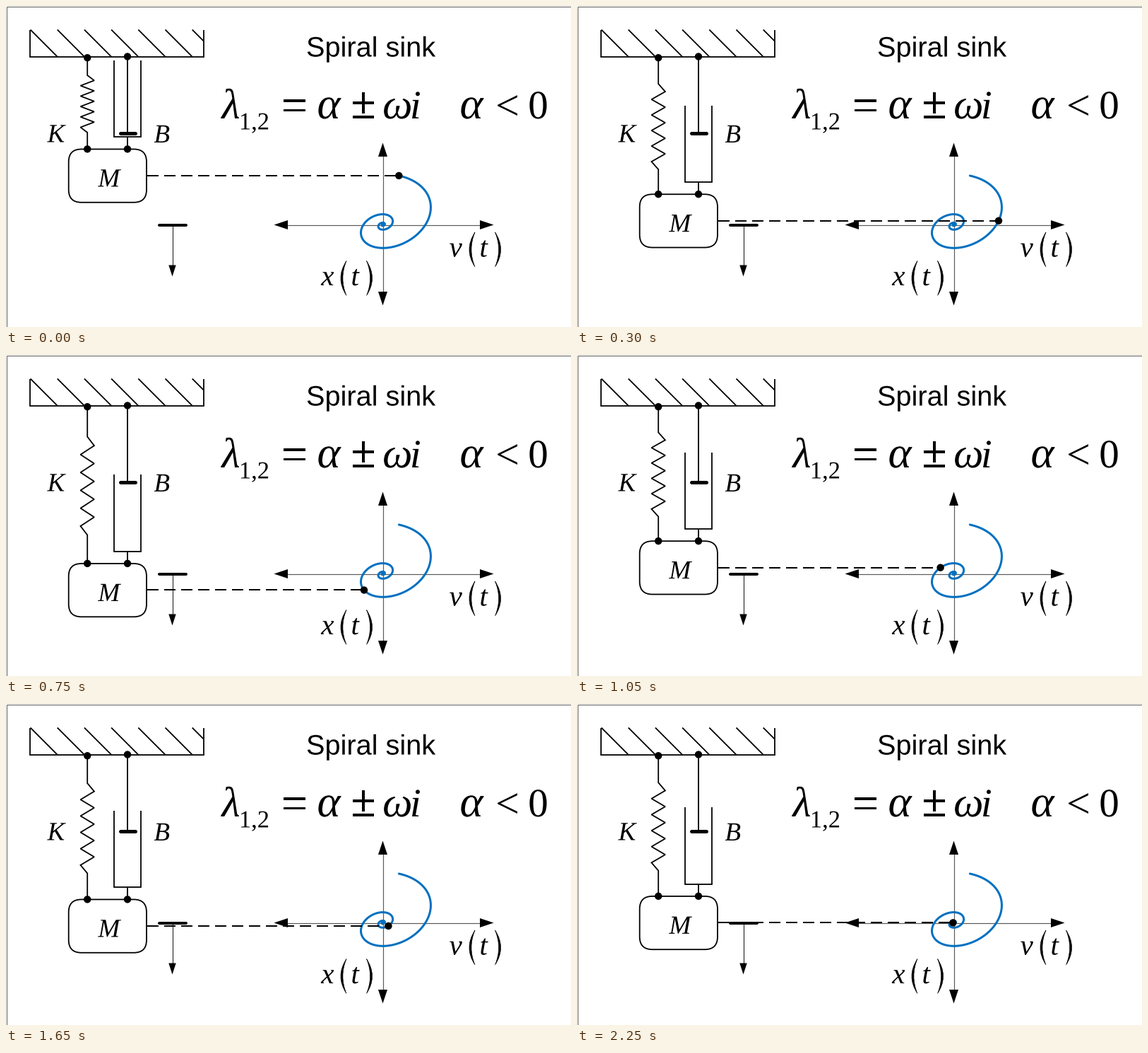
A matplotlib script that plays this animation: 800x454 px, repeating every 2400 ms.

```python
import numpy as np
import matplotlib.pyplot as plt
from matplotlib.animation import FuncAnimation
from matplotlib.patches import Circle, FancyBboxPatch, PathPatch, Polygon, Rectangle
from matplotlib.path import Path
from matplotlib.textpath import TextPath
from matplotlib.transforms import Affine2D

W, H, DPI = 800, 454, 64
PT = 72 / DPI
BLUE = "#0070c0"
GRAY = "#5a5a5a"
CX, CY = 533, 309
SPRING_X, ROD_X = 114.7, 171.5

# Whole numbers are pixel centres
fig = plt.figure(figsize=(W / DPI, H / DPI), dpi=DPI, facecolor="white")
ax = fig.add_axes([0, 0, 1, 1])
ax.set_xlim(-0.5, W - 0.5)
ax.set_ylim(H - 0.5, -0.5)
ax.axis("off")

shift = Affine2D()
moving = shift + ax.transData


def line(xs, ys, width=1.8, color="black", z=2, cap="butt", **kw):
    return ax.plot(xs, ys, color=color, lw=width * PT, zorder=z,
                   solid_capstyle=cap, solid_joinstyle="miter", **kw)[0]


def dot(x, y, r=5.2, z=6, **kw):
    return ax.add_patch(Circle((x, y), r, fc="black", ec="none", zorder=z, **kw))


def text(s, x, base, size, family="Liberation Serif", style="normal", **kw):
    """Text with its ink centred on x, standing on the given baseline."""
    path = TextPath((0, 0), s, size=size, prop={"family": [family], "style": style})
    box = path.get_extents()
    verts = path.vertices * [1, -1] + [x - (box.x0 + box.x1) / 2, base]
    ax.add_patch(PathPatch(Path(verts, path.codes), fc="black", ec="none",
                           zorder=3, **kw))


def italic(s, x, base, size, **kw):
    text(s, x, base, size, style="italic", **kw)


def paren(tip, bulge, y, half=24.5):
    """Tall thin parenthesis, opening towards its tips."""
    side = np.sign(bulge)
    verts = [(tip, y - half), (tip + 1.8 * bulge, y), (tip, y + half),
             (tip + 1.8 * bulge - 6 * side, y), (tip, y - half)]
    codes = [Path.MOVETO] + [Path.CURVE3] * 4
    ax.add_patch(PathPatch(Path(verts, codes), fc="black", ec="black",
                           lw=0.6 * PT, zorder=3))


def arrow(x, y, dx, dy, length, half):
    """Filled arrowhead with its tip at (x, y), pointing along (dx, dy)."""
    bx, by = x - dx * length, y - dy * length
    ax.add_patch(Polygon([(x, y), (bx - dy * half, by + dx * half),
                          (bx + dy * half, by - dx * half)],
                         fc="black", ec="none", zorder=3))


def spiral(theta):
    """Decaying state: velocity to the right, displacement downwards."""
    decay = np.exp(-0.25 * theta)
    v = -44.5 * decay * np.sin(theta)
    x = decay * (32.8 * np.cos(theta) + 8 * np.sin(theta))
    return CX + v, CY + x


# Border and ceiling
ax.add_patch(Rectangle((0, 0), W - 1, H - 1, fill=False, ec="#606060", lw=PT))
line([33.5, 33.5, 279.5, 279.5], [33, 71.5, 71.5, 33])
for i in range(7):
    left = 34 + 38.2 * i
    run = min(38, 279.5 - left)
    line([left, left + run], [33, 33 + run])

# Fixed end of spring and damper
dot(SPRING_X, 72.7)
dot(ROD_X, 71)
line([ROD_X, ROD_X], [71, 180])
line([161, 182], [179.8, 179.8], 5, cap="round")

# Reference level
line([216, 254.5], [309, 309], 4, cap="round", z=4)
line([235, 235], [309, 370], 1.2, "#303030")
arrow(235, 382, 0, 1, 16, 5.2)

# Phase plane
line([390, 680], [CY, CY], 1.2, GRAY)
line([CX, CX], [205, 410], 1.2, GRAY)
arrow(379, CY, -1, 0, 19.5, 6.5)
arrow(690, CY, 1, 0, 19.5, 6.5)
arrow(CX, 193, 0, -1, 19.5, 6.5)
arrow(CX, 423, 0, 1, 19.5, 6.5)
line(*spiral(np.linspace(-2.89, 20, 600)), width=3, color=BLUE, z=4, cap="round")

# Labels
text("Spiral sink", 517, 71, 39.7, "Liberation Sans")
italic("K", 71, 192, 37)
italic("B", 220, 192.5, 37)
italic("λ", 316.5, 158.5, 60)
text("1,2", 351.5, 174, 34.5)
text("=", 408, 162, 66)
italic("α", 458, 158.5, 63)
text("±", 505.5, 158, 65)
italic("ω", 553.5, 158.5, 60)
italic("i", 580, 158.5, 57)
italic("α", 660, 158.5, 63)
text("<", 709.5, 160, 60)
text("0", 753, 158.5, 57)
for name, x, base in (("v", 636.5, 354), ("x", 454.5, 394.5)):
    italic(name, x, base, 41)
    paren(x + 27, -9, base - 10)
    italic("t", x + 40.5, base, 41)
    paren(x + 55.5, 9, base - 10)

# Mass with the damper cup, drawn around its own centre
ax.add_patch(FancyBboxPatch((88.2, -37.5), 110.3, 75.3,
                            boxstyle="round,pad=0,rounding_size=18",
                            fill=False, lw=1.8 * PT, zorder=2, transform=moving))
line([152.5, 152.5, 190.5, 190.5], [-163, -54.5, -54.5, -163], transform=moving)
line([ROD_X, ROD_X], [-54.5, -37.5], transform=moving)
dot(SPRING_X, -37.6, transform=moving)
dot(ROD_X, -37.6, transform=moving)
italic("M", 146, 15.5, 37, transform=moving)

spring = line([], [])
link = line([], [], 2, z=5, dashes=(8, 4))
state = dot(0, 0, z=7)

# Spring outline: sideways offset and share of the length
COIL_X = SPRING_X + 9.7 * np.array([0, 0] + [1, -1] * 5 + [0, 0])
COIL_Y = np.concatenate([[0], np.linspace(0.19, 0.818, 12), [1]])

# Phase reached at each step; the last step jumps to rest
PHASES = [-2.89, -2.17, -1.45, -0.66, 0.03, 0.82, 1.57, 2.29,
          3.33, 4.15, 4.6, 5.5, 6.1, 6.75, 7.6, 14.5]


def update(i):
    x, y = spiral(PHASES[i])
    shift.clear().translate(0, y)
    spring.set_data(COIL_X, 73 + COIL_Y * (y - 37.6 - 73))
    link.set_data([199, x], [y, y])
    state.center = (x, y)
    return spring, link, state


anim = FuncAnimation(fig, update, frames=len(PHASES), interval=150,
                     repeat=True, repeat_delay=0, blit=False)
plt.show()
```
